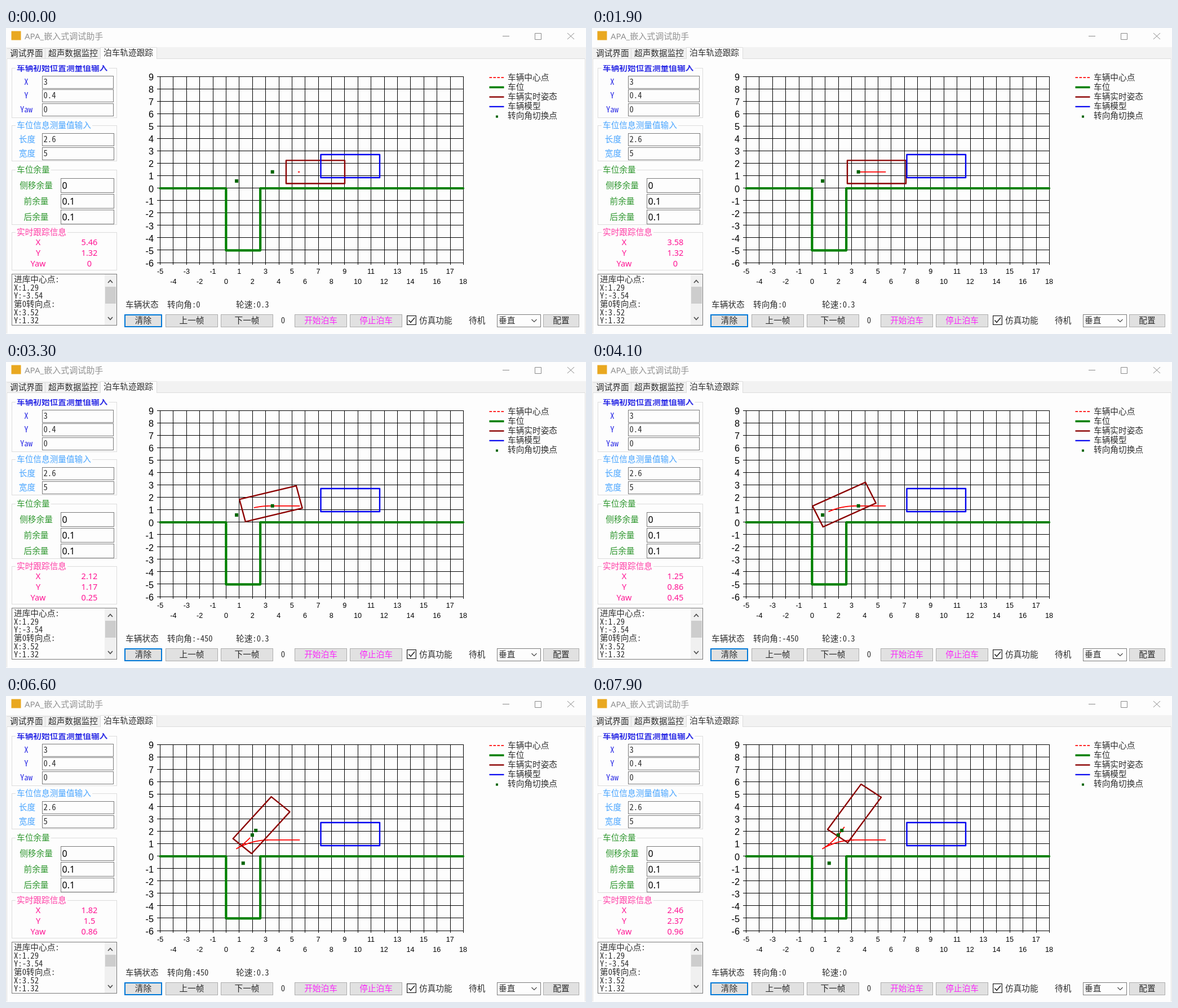
An HTML page for the animation above (8 s loop, 1029 px wide and 544 px high).

```html
<!DOCTYPE html>
<html lang="zh">
<head>
<meta charset="utf-8">
<style>
  html, body { margin: 0; width: 100%; height: 100%; overflow: hidden; background: #fdfdfd; }
  svg { display: block; width: 100vw; height: 100vh; }
  text { white-space: pre; }
  .ui { font-family: "Noto Sans Mono CJK SC", "Noto Sans CJK SC", "Noto Sans CJK", monospace; fill-opacity: .82; }
  .sans { font-family: "Noto Sans", "Noto Sans CJK SC", sans-serif; }
  .num { font-family: "Liberation Sans", Arial, sans-serif; }
</style>
</head>
<body>
<svg id="stage" viewBox="0 0 1029 544"></svg>
<script>
const LOOP = 8000, STEP = 100, EM = 14.67, BG = '#fdfdfd';
const stage = document.getElementById('stage');

function add(tag, attrs, content) {
  const el = document.createElementNS(stage.namespaceURI, tag);
  for (const k in attrs) el.setAttribute(k, attrs[k]);
  if (content !== undefined) el.textContent = content;
  return stage.appendChild(el);
}
// cy is the vertical middle of the glyphs
function label(str, x, cy, opt = {}) {
  const { size = EM, fill = '#000', font = 'ui', anchor = 'start', weight = 400 } = opt;
  return add('text', { x, y: cy + size * 0.37, class: font, fill, 'font-size': size,
    'text-anchor': anchor, 'font-weight': weight }, str);
}
function box(x1, y1, x2, y2, fill, stroke, w = 1) {
  return add('rect', { x: x1 + w / 2, y: y1 + w / 2, width: x2 - x1 - w, height: y2 - y1 - w,
    fill, stroke: stroke || 'none', 'stroke-width': stroke ? w : 0 });
}
function stroke(d, color, width = 1, extra = {}) {
  return add('path', { d, fill: 'none', stroke: color, 'stroke-width': width, ...extra });
}

// --- window frame and tabs ---
function drawWindow() {
  box(9, 5, 27, 22, '#e9a820');
  label('APA_嵌入式调试助手', 33, 14, { size: 15, fill: '#929292', font: 'sans' });
  stroke('M881 14.5H893M938.5 9.5H949.5V20.5H938.5ZM996 9L1008 20M1008 9L996 20', '#8a8a8a');
  add('rect', { x: 0, y: 34, width: 1029, height: 20, fill: '#f2f2f2' });
  stroke('M1.5 543V54.5M1.5 36.5H167M1.5 54.5H167M268 54.5H1027.5V543M69.5 37V54', '#dcdcdc');
  add('rect', { x: 167, y: 34, width: 101, height: 22, fill: BG });
  stroke('M167.5 55V34.5H267.5V55', '#dcdcdc');
  label('调试界面', 7, 45);
  label('超声数据监控', 75, 45);
  label('泊车轨迹跟踪', 173, 43.5);
}

// --- left column ---
function group(title, y1, y2, fill, weight = 400) {
  box(10, y1, 197, y2, 'none', '#dcdcdc');
  add('rect', { x: 17, y: y1 - 2, width: title.length * EM + 4, height: 5, fill: BG });
  label(title, 19, y1 - 0.5, { fill, weight });
}
function field(name, value, cy, o) {
  label(name, o.cx, cy + o.dy, { fill: o.fill, anchor: 'middle' });
  box(o.x, cy - o.h / 2, o.x2, cy + o.h / 2, BG, '#7a7a7a');
  label(value, o.x + 2.5, cy + o.vy, { font: o.font, size: o.size });
}
function drawInputs() {
  const blue = '#0000e0', sky = '#1e90ff', green = '#008000';
  group('车辆初始位置测量值输入', 71, 160, blue, 700);
  add('rect', { x: 10, y: 56, width: 190, height: 10, fill: BG });
  const a = { cx: 36, dy: -0.5, fill: blue, x: 64, x2: 191, h: 23, vy: -1, font: 'ui', size: EM };
  field('X', '3', 96.5, a);
  field('Y', '0.4', 120.5, a);
  field('Yaw', '0', 145.5, a);
  group('车位信息测量值输入', 173, 237, sky);
  const b = { ...a, cx: 37.5, fill: sky, x2: 192 };
  field('长度', '2.6', 198.5, b);
  field('宽度', '5', 223.5, b);
  group('车位余量', 252, 350, green);
  const c = { cx: 53.5, dy: -0.5, fill: green, x: 97, x2: 192, h: 26, vy: 0, font: 'sans', size: 16 };
  field('侧移余量', '0', 280, c);
  field('前余量', '0.1', 308, c);
  field('后余量', '0.1', 336, c);
}
function drawReadout() {
  const o = { fill: '#ff1493', font: 'sans', size: 14.5, anchor: 'middle' };
  group('实时跟踪信息', 363, 431, o.fill, 500);
  return ['X', 'Y', 'Yaw'].map((name, i) => {
    const y = 380.8 + i * 18.8;
    label(name, 57, y, o);
    return label('', 148, y, o);
  });
}
function drawLog() {
  box(10, 437, 197, 529, BG, '#7a7a7a');
  ['进库中心点:', 'X:1.29', 'Y:-3.54', '第0转向点:', 'X:3.52', 'Y:1.32']
    .forEach((s, i) => label(s, 14, 446.5 + i * 14.7));
  add('rect', { x: 175, y: 438, width: 21, height: 90, fill: '#f0f0f0' });
  stroke('M181 453L185 448.5L189 453M181 514L185 518.5L189 514', '#505050', 1.8);
  return add('rect', { x: 176, y: 460, width: 19, height: 30, fill: '#cdcdcd' });
}

// --- bottom row ---
function button(str, x1, x2, fill = '#000', focus) {
  box(x1, 509, x2, 532, '#e1e1e1', focus ? '#0078d7' : '#adadad', focus ? 2 : 1);
  label(str, (x1 + x2) / 2, 520, { anchor: 'middle', fill });
}
function drawControls() {
  button('清除', 210, 277, '#000', true);
  button('上一帧', 283, 376);
  button('下一帧', 381, 474);
  label('0', 491.5, 520, { anchor: 'middle' });
  button('开始泊车', 512, 605, '#ff00ff');
  button('停止泊车', 610, 703, '#ff00ff');
  box(711, 511, 728, 528, BG, '#222', 1.2);
  stroke('M714.5 519.5L718 523.5L725 515', '#111', 1.4);
  label('仿真功能', 733, 519.5);
  label('待机', 821, 520);
  box(871, 509, 949, 532, BG, '#7a7a7a');
  label('垂直', 874, 520);
  stroke('M932.5 518L937 522.5L941.5 518', '#444', 1.1);
  button('配置', 953, 1017);
  label('车辆状态', 212, 491.5);
  return [label('', 286, 491.5), label('', 408, 491.5)];
}

// --- chart ---
const px = x => 390.4 + x * 23.37;
const py = y => 285 - y * 22.067;
const line = pts => 'M' + pts.map(([x, y]) => px(x).toFixed(2) + ' ' + py(y).toFixed(2)).join('L');

function drawChart() {
  // grid lines sit on whole pixels
  let d = '';
  for (let x = -5; x <= 18; x++) {
    d += `M${Math.round(390.03 + x * 23.385) + 0.5} 86V421`;
    label(x, px(x), x % 2 ? 432.5 : 450.5, { font: 'num', size: 12.6, anchor: 'middle' });
  }
  for (let y = -6; y <= 9; y++) {
    d += `M268 ${Math.floor(py(y) - 0.38) + 0.5}H811`;
    label(y, 262, py(y) + 0.5, { font: 'num', size: 16.3, anchor: 'end' });
  }
  stroke(d, '#000', 1, { 'shape-rendering': 'crispEdges' });

  const trail = stroke('', '#f00', 1.8);
  stroke(line([[-5, 0], [0, 0], [0, -5], [2.6, -5], [2.6, 0], [18, 0]]), '#008000', 4.2,
    { 'stroke-linejoin': 'round', 'stroke-linecap': 'round' });
  const car = stroke('', '#8b0000', 2.4, { 'stroke-linejoin': 'round' });
  stroke('M558.5 225H663V266H558.5Z', '#0000f0', 2.4, { 'stroke-linejoin': 'round' });
  const marks = add('path', { fill: '#006400' });

  [['车辆中心点', '#f00', 1.8], ['车位', '#008000', 3.6], ['车辆实时姿态', '#8b0000', 2.4],
   ['车辆模型', '#0000f0', 2.2], ['转向角切换点']].forEach(([name, color, w], i) => {
    const y = 87.2 + i * 17.2;
    label(name, 890, y);
    if (color) stroke(`M857.5 ${y + 1}H883.5`, color, w, i ? {} : { 'stroke-dasharray': '4.6 2.4' });
    else add('rect', { x: 869, y: y - 0.5, width: 4, height: 4, fill: '#006400' });
  });
  return { trail, car, marks };
}

// --- motion: bicycle path by arc length, reversing up to TURN, then forward ---
const R = 4.7, START = -2.08, TURN = 2.89, STRAIGHT = TURN + 1.66, DS = 0.002;
const clamp = v => Math.max(0, Math.min(1, v));
const curve = s => clamp(s / 0.5) * clamp(1 - (s - STRAIGHT) / 0.45) / R;
const path = [];
for (let s = START, x = 5.6, y = 1.318, yaw = 0; s < 5.45; s += DS) {
  path.push([x, y, yaw]);
  const dir = s < TURN ? -DS : DS;
  yaw += curve(s + DS / 2) * DS;
  x += dir * Math.cos(yaw);
  y += dir * Math.sin(yaw);
}

// time in ms, distance from the first steering point
const drive = [[0, -1.94], [900, -0.96], [1100, -0.79], [1800, -0.15], [2600, 0.58], [2700, 0.67],
  [3600, 1.79], [4100, 2.342], [4500, 2.75], [4900, 2.85], [5300, TURN], [5600, TURN],
  [6300, 3.99], [6600, 4.292], [7200, 4.63], [7900, 5.37]];
function distance(t) {
  const i = Math.max(1, drive.findIndex(k => k[0] >= t));
  const [t0, a] = drive[i - 1], [t1, b] = drive[i];
  return a + (b - a) * (t - t0) / (t1 - t0);
}

const round2 = v => String(+v.toFixed(2));
const REAR = -0.9, FRONT = 3.55, HALF = 0.93;
const firstMarks = [[0.8, 0.59], [3.52, 1.32]];
const nextMarks = [[1.99, 1.71], [2.26, 2.08], [1.3, -0.55]];

drawWindow();
drawInputs();
const readout = drawReadout();
const thumb = drawLog();
const [steer, wheel] = drawControls();
const { trail, car, marks } = drawChart();

function render(t) {
  const n = Math.round((distance(t) - START) / DS);
  const [x, y, yaw] = path[Math.min(n, path.length - 1)];
  const c = Math.cos(yaw), s = Math.sin(yaw);
  const corners = [[REAR, HALF], [FRONT, HALF], [FRONT, -HALF], [REAR, -HALF]]
    .map(([u, v]) => [x + u * c - v * s, y + u * s + v * c]);
  car.setAttribute('d', line(corners) + 'Z');
  trail.setAttribute('d', line([...path.slice(0, n).filter((p, i) => i % 15 === 0), [x, y]]));

  const parked = t >= 4800;
  marks.setAttribute('d', (parked ? nextMarks : firstMarks)
    .map(([a, b]) => `M${px(a) - 3} ${py(b) - 3}h6v6h-6z`).join(''));
  thumb.setAttribute('height', parked ? 21 : 30);
  [x, y, yaw].forEach((v, i) => { readout[i].textContent = round2(v); });
  const angle = t < 2000 ? 0 : !parked ? -450 : t < 7100 ? 450 : 0;
  const stopped = parked && t < 5700 || t >= 7600;
  steer.textContent = '转向角:' + angle;
  wheel.textContent = '轮速:' + (stopped ? 0 : 0.3);
}

const begin = performance.now();
function tick() {
  const t = (performance.now() - begin) % LOOP;
  render(Math.floor(t / STEP) * STEP);
  requestAnimationFrame(tick);
}
tick();
</script>
</body>
</html>
```
